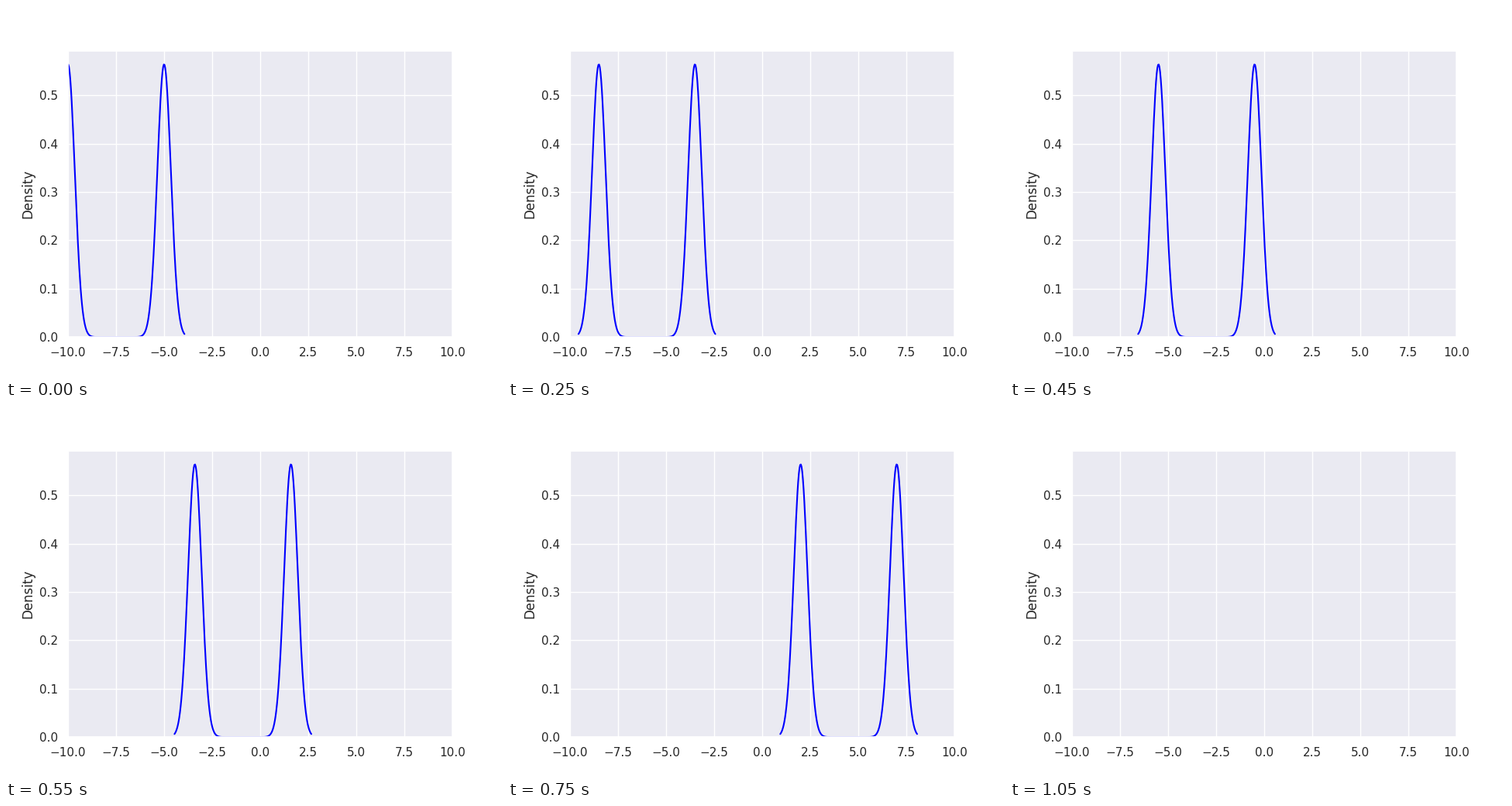
A matplotlib script for the animation above (2000 ms loop, 640x480 px).

```python
import numpy as np
import matplotlib.pyplot as plt
from matplotlib.animation import FuncAnimation

INK = ".15"
plt.rcParams.update({
    "font.family": "DejaVu Sans",
    "text.color": INK,
    "axes.facecolor": "#EAEAF2",
    "axes.edgecolor": "white",
    "axes.labelcolor": INK,
    "axes.linewidth": 1.25,
    "axes.labelsize": 12,
    "axes.axisbelow": True,
    "axes.grid": True,
    "grid.color": "white",
    "grid.linewidth": 1,
    "grid.linestyle": "-",
    "lines.linewidth": 1.5,
    "lines.solid_capstyle": "round",
})
for axis in ("xtick", "ytick"):
    plt.rcParams.update({
        f"{axis}.color": INK,
        f"{axis}.labelsize": 11,
        f"{axis}.major.size": 6,
    })
plt.rcParams.update({"xtick.bottom": False, "ytick.left": False})

FRAMES, INTERVAL = 40, 50
GAP = 5
BW = 0.1 * GAP / np.sqrt(2)   # a tenth of the sample deviation of two points
PEAK = 0.5 / (BW * np.sqrt(2 * np.pi))


def density(x, centres):
    """Mean of one Gaussian per centre."""
    return sum(PEAK * np.exp(-0.5 * ((x - c) / BW) ** 2) for c in centres)


fig, ax = plt.subplots(figsize=(6.4, 4.8), dpi=100, facecolor="white")
ax.set(xlim=(-10, 10), ylim=(0, PEAK * 1.05), ylabel="Density")
line, = ax.plot([], [], color="b")


def update(i):
    # constant acceleration: each step is 0.1 longer than the last
    left = -10 + 0.1 * i * (i + 1) / 2
    x = np.linspace(left - 3 * BW, left + GAP + 3 * BW, 200)
    line.set_data(x, density(x, (left, left + GAP)))
    return line,


anim = FuncAnimation(fig, update, frames=FRAMES, interval=INTERVAL,
                     repeat=True, repeat_delay=0)
plt.show()
```
